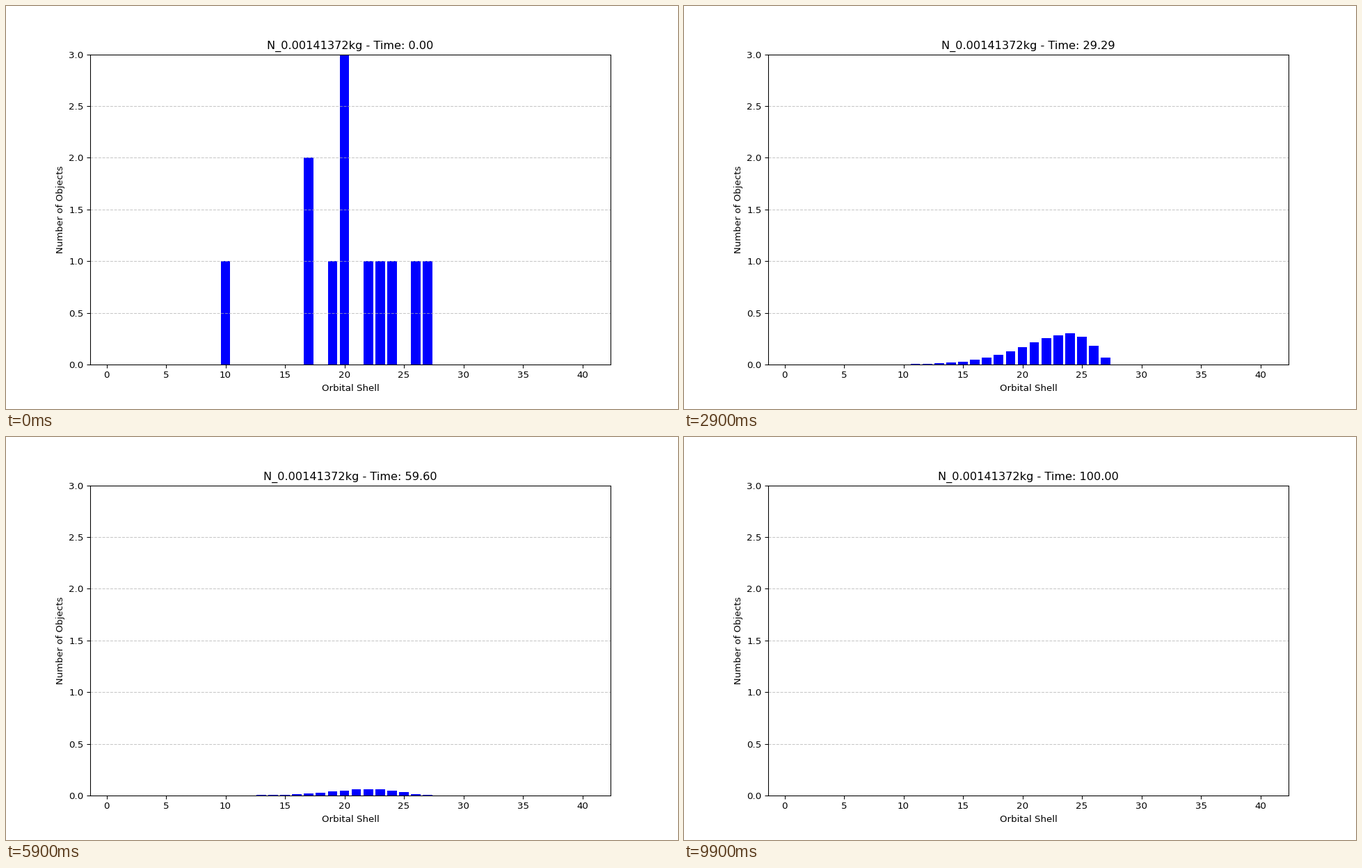
These frames come from a looping animation (966x580 px, 10000 ms). A matplotlib script:

```python
import numpy as np
import matplotlib.pyplot as plt
from matplotlib.animation import FuncAnimation

WIDTH, HEIGHT, DPI = 966, 580, 96.6
FRAMES = 100
SHELLS = np.arange(1, 41)
MASS = 0.00141372      # kg
RADIUS = 0.01          # m
DRAG_COEFF = 2.2
STEP = 30.0            # shell thickness, km
EARTH, MU = 6378.137, 398600.4418
YEAR = 365.25 * 24 * 3600

# Piecewise exponential atmosphere: base altitude km, density kg/m^3, scale height km
AIR = np.array([
    (200, 2.789e-10, 37.105), (250, 7.248e-11, 45.546),
    (300, 2.418e-11, 53.628), (350, 9.518e-12, 53.298),
    (400, 3.725e-12, 58.515), (450, 1.585e-12, 60.828),
    (500, 6.967e-13, 63.822), (600, 1.454e-13, 71.835),
    (700, 3.614e-14, 88.667), (800, 1.170e-14, 124.64),
    (900, 5.245e-15, 181.05), (1000, 3.019e-15, 268.0),
])
START = {10: 1, 17: 2, 19: 1, 20: 3, 22: 1, 23: 1, 24: 1, 26: 1, 27: 1}


def density(alt):
    base, rho, scale = AIR[np.searchsorted(AIR[:, 0], alt, side="right") - 1].T
    return rho * np.exp((base - alt) / scale)


def decay_rates():
    """Share of each shell that sinks into the next one per year."""
    alt = 200 + STEP * (SHELLS - 1)
    ballistic = DRAG_COEFF * np.pi * RADIUS**2 / MASS * 1e-6   # km^2/kg
    sink = ballistic * density(alt) * 1e9 * np.sqrt(MU * (EARTH + alt))
    return sink * YEAR / STEP


def simulate(times):
    k = decay_rates()
    flow = np.diag(-k) + np.diag(k[1:], 1)
    start = np.array([START.get(s, 0) for s in SHELLS], float)
    rates, modes = np.linalg.eig(flow)
    weights = np.linalg.solve(modes, start)
    counts = (np.exp(np.outer(times, rates)) * weights) @ modes.T
    return np.clip(counts.real, 0, None)


times = np.linspace(0, 100, FRAMES)
counts = simulate(times)

plt.rcParams["font.family"] = "DejaVu Sans"
fig, ax = plt.subplots(figsize=(WIDTH / DPI, HEIGHT / DPI), dpi=DPI)
fig.subplots_adjust(bottom=64 / HEIGHT)   # baseline on a whole pixel
bars = ax.bar(SHELLS, counts[0], color="blue")
ax.set_ylim(0, 3)
ax.set_xlabel("Orbital Shell")
ax.set_ylabel("Number of Objects")
ax.grid(axis="y", linestyle="--", alpha=0.7)
title = ax.set_title("")


def update(i):
    for bar, count in zip(bars, counts[i]):
        bar.set_height(count)
    title.set_text(f"N_{MASS}kg - Time: {times[i]:.2f}")
    return [*bars, title]


anim = FuncAnimation(fig, update, frames=FRAMES, interval=100, repeat=True)
plt.show()
```
